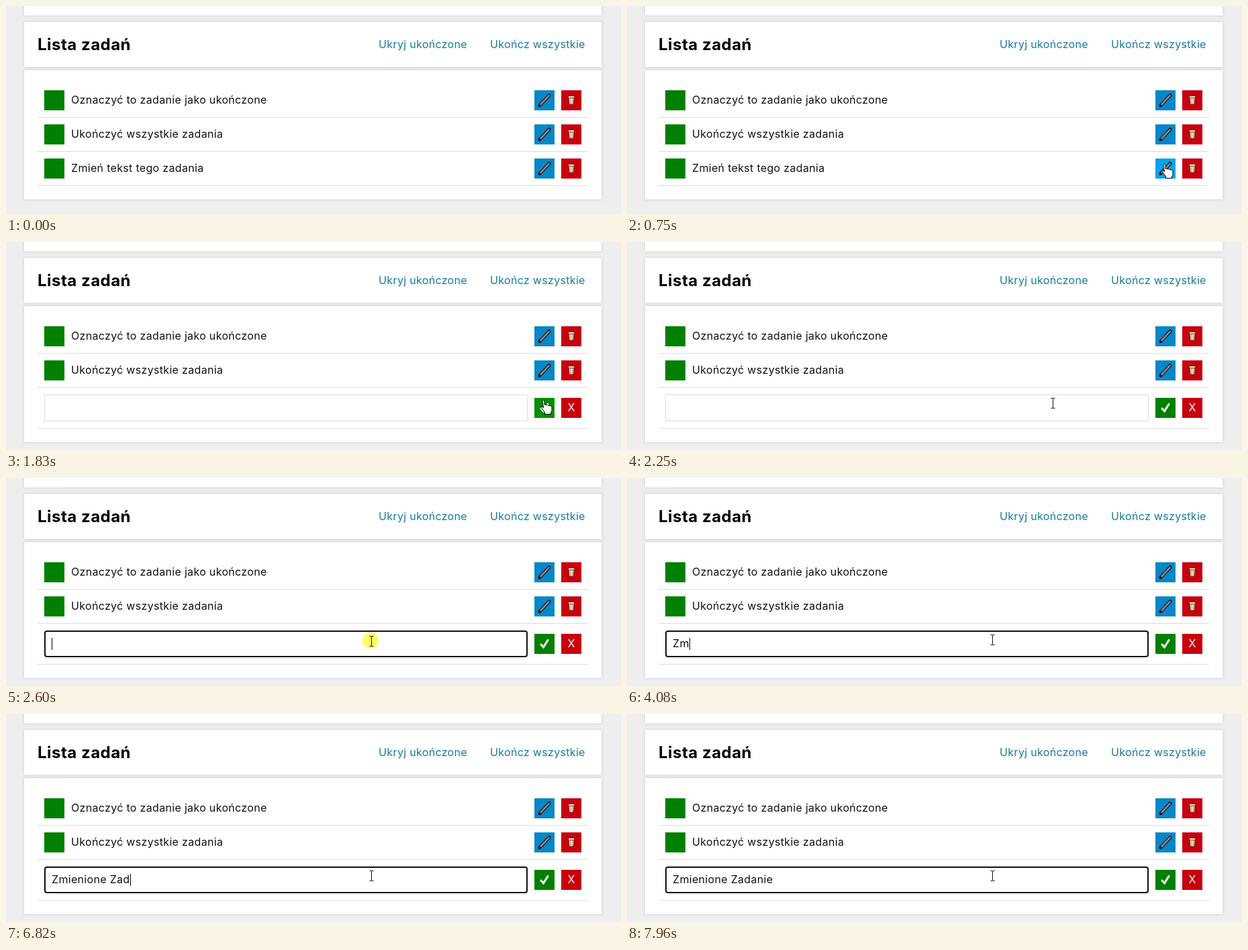
Write an HTML page that moves like this. It is 916x311 px and loops after 8000 ms.

```html
<!DOCTYPE html>
<html lang="pl">
<head>
<meta charset="utf-8">
<title>Lista zadań</title>
<style>
  html, body { margin: 0; width: 100%; height: 100%; overflow: hidden; background: #eee; }
  svg { display: block; }
  text { font: 400 16px Inter, sans-serif; letter-spacing: .02em; fill: #111; white-space: pre; }
  .panel { fill: #fff; filter: drop-shadow(0 0 2px #ccc); }
  .title { font-weight: 700; font-size: 24px; fill: #000; }
  .link { fill: #167a9c; }
  .line { fill: #ddd; }
  .done { fill: #008000; }
  .edit { fill: #0587c8; }
  .drop { fill: #c8000e; }
  .white { fill: #fff; text-anchor: middle; letter-spacing: 0; }
  .tip { font: 12px "Open Sans", sans-serif; letter-spacing: 0; fill: #575757; }
</style>
</head>
<body>
<svg width="916" height="311" viewBox="0 0 916 311">
  <defs>
    <g id="pen" fill="none" stroke-linecap="round">
      <path d="M8 22.5L22 7.5" stroke="#15151c" stroke-width="5"/>
      <path d="M6.5 24.5L9 21" stroke="#15151c" stroke-width="1.5"/>
      <path d="M9.5 21L21.7 7.8" stroke="#92868e" stroke-width="2.6"/>
    </g>
    <g id="bin" stroke="#54200f" stroke-width=".8">
      <path d="M11 10.5L12 21h6l1-10.500z" fill="#e9dfb9"/>
      <path d="M13.500 12v8M16.500 12v8" stroke="#a98" fill="none"/>
      <rect x="10.400" y="8.400" width="9.200" height="3" rx="1.500" fill="#f3ecc9"/>
    </g>
    <path id="arrow" d="M.5.5v16l3.700-3.500 2.500 5.700 2.500-1.100-2.500-5.500h5.100z" fill="#fff" stroke="#000"/>
    <path id="hand" d="M-2 1.500q1.500-2 3 0v6q1.500-1.200 3 .4 1.600-1 3 .6 1.700-.8 3 .8 1.400-.2 2 1.200v5q0 2-1.500 3.500v2.500h-9v-2.500l-5.500-7.500q0-2.500 2-1.500l1.500 2z" fill="#fff" stroke="#000"/>
    <path id="beam" d="M-3 -7.500h2.500l.5.500.5-.5h2.500M0 -7v14M-3 7.500h2.500l.5-.5.5.5h2.500" fill="none" stroke="#111"/>
  </defs>

  <rect width="916" height="311" fill="#eee"/>
  <rect class="panel" x="27" y="-20" width="860" height="34"/>
  <rect class="panel" x="27" y="24" width="860" height="67"/>
  <rect class="panel" id="body" x="27" y="96" width="860" height="193"/>
  <text class="title" x="47" y="66">Lista zadań</text>
  <text class="link" x="555" y="63">Ukryj ukończone</text>
  <text class="link" x="721" y="63">Ukończ wszystkie</text>
  <g id="rows"></g>

  <g id="form">
    <rect class="line" x="47" y="278" width="820" height="1"/>
    <rect id="blur" x="57.500" y="228.500" width="719" height="39" fill="#fff" stroke="#ddd"/>
    <rect id="focus" x="58" y="229" width="718" height="38" rx="3" fill="#fff" stroke="#101010" stroke-width="2"/>
    <text id="typed" x="68" y="253"></text>
    <rect id="caret" y="239" width="1" height="18"/>
    <rect class="done" id="save" x="787" y="233" width="30" height="30"/>
    <path d="M797 249l3.500 4L807 242.500" fill="none" stroke="#fff" stroke-width="3" stroke-linecap="round"/>
    <rect class="drop" x="827" y="233" width="30" height="30"/>
    <text class="white" x="842" y="253">X</text>
  </g>

  <g id="tip">
    <rect x="813" y="252" width="88" height="20" fill="#0003"/>
    <rect x="810.500" y="249.500" width="88" height="20" fill="#fff" stroke="#808080"/>
    <text class="tip" x="815" y="264">Edytuj zadanie</text>
  </g>
  <circle id="glow" r="12" fill="#ff0" fill-opacity=".62"/>
  <use id="cursor"/>
</svg>
<script>
const LOOP = 8000, STEP = 70;
const $ = id => document.getElementById(id);
const set = (id, attrs) => { for (const k in attrs) $(id).setAttribute(k, attrs[k]); };
const show = (id, on) => { $(id).style.display = on ? "" : "none"; };

const tasks = ["Oznaczyć to zadanie jako ukończone", "Ukończyć wszystkie zadania", "Zmień tekst tego zadania"];
$("rows").innerHTML = tasks.map((task, i) => `
  <g id="row${i}" transform="translate(0 ${126 + 51 * i})">
    <rect class="done" x="57" width="30" height="30"/>
    <text x="97" y="20">${task}</text>
    <rect class="edit" id="edit${i}" x="787" width="30" height="30"/>
    <use href="#pen" x="787"/>
    <rect class="drop" x="827" width="30" height="30"/>
    <use href="#bin" x="827"/>
    <rect class="line" x="47" y="40" width="820" height="1"/>
  </g>`).join("");

const phrase = "Zmienione Zadanie";
const keys = [3750, 4080, 4210, 4280, 4550, 4680, 5090, 5550, 5620,
  5880, 6230, 6560, 6820, 6950, 7150, 7280, 7410];

// Eased progress, held between pointer samples
function glide(t, from, to) {
  const held = from + Math.floor((t - from) / STEP) * STEP;
  const p = Math.min(1, Math.max(0, (held - from) / (to - from)));
  return p * p * (3 - 2 * p);
}

function pointer(t) {
  if (t < 400) return null;
  if (t < 1830) {
    const p = glide(t, 330, 750);
    return [846 - 45 * p, 296 - 60 * p];
  }
  const p = glide(t, 1830, 2530);
  return [801 - 257 * p, 236 + (t < 2730 ? 8 : 6) * p];
}

function draw(t) {
  const editing = t >= 1830, focused = t >= 2600, pressed = t >= 1630 && !editing;
  const pos = pointer(t);

  set("body", { height: editing ? 203 : 193 });
  show("row2", !editing);
  show("form", editing);
  show("blur", !focused);
  show("focus", focused);
  show("tip", t >= 1300 && t < 1630);

  const count = keys.filter(k => k <= t).length;
  $("typed").textContent = phrase.slice(0, count);
  const hidden = !focused || (t >= 3150 && t < 3680) || t >= 7960;
  show("caret", !hidden);
  if (!hidden) set("caret", { x: Math.round(68 + (count ? $("typed").getComputedTextLength() : 0)) });

  show("cursor", pos);
  show("glow", pressed || (focused && t < 2880));
  if (!pos) pos0();
  else {
    const [x, y] = pos.map(Math.round);
    const onButton = x >= 787 && x < 817 && y >= 228 && y < 263;
    const kind = onButton ? "hand" : editing && x < 777 ? "beam" : "arrow";
    set("cursor", { href: "#" + kind, x: kind === "beam" ? x + .5 : x, y });
    set("glow", { cx: x - 1, cy: editing ? 243 : 234 });
    hover(onButton, editing, pressed);
  }
}

function hover(on, editing, pressed) {
  $("edit2").style.fill = on && !editing ? "#06a3f1" : "";
  $("save").style.fill = on && editing ? "#009000" : "";
  set("edit2", { stroke: pressed ? "#000" : "none", "stroke-width": 2, "paint-order": "stroke" });
  set("edit2", pressed ? { x: 786, y: -1, width: 32, height: 32 } : { x: 787, y: 0, width: 30, height: 30 });
}
const pos0 = () => hover(false, false, false);

function frame(now) {
  draw(now % LOOP);
  requestAnimationFrame(frame);
}
draw(0);
requestAnimationFrame(frame);
</script>
</body>
</html>
```
